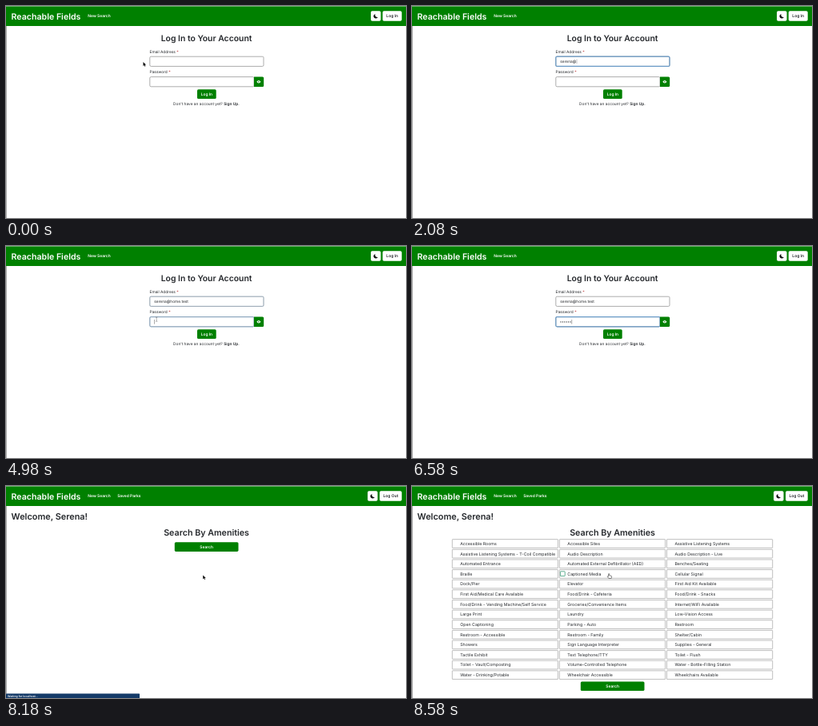
Animation, 500 px wide and 265 px high, one loop 8780 ms. Source, as an HTML page:

```html
<!DOCTYPE html>
<html lang="en">
<head>
<meta charset="utf-8">
<title>Log in demo</title>
<style>
html, body { margin: 0; width: 100%; height: 100%; overflow: hidden; background: #fff; }
svg { display: block; width: 500px; height: 265px; font-family: Inter, sans-serif; text-rendering: geometricPrecision; }
</style>
</head>
<body>
<svg id="stage" viewBox="0 0 500 265"></svg>
<script>
const LOOP = 8780, GREEN = '#008000', INK = '#25282c';
const EMAIL = 'serena@home.test';
const EMAIL_KEYS = [[1480, 1], [1580, 2], [1680, 3], [1780, 4], [1880, 6], [2080, 7], [2480, 8],
  [2580, 9], [2680, 10], [2780, 11], [2980, 12], [3080, 13], [3280, 16]];
const PASS_KEYS = [[5780, 1], [5880, 2], [5980, 3], [6080, 5], [6180, 6]];
const AMENITIES = `Accessible Rooms|Accessible Sites|Assistive Listening Systems
Assistive Listening Systems - T-Coil Compatible|Audio Description|Audio Description - Live
Automated Entrance|Automated External Defibrillator (AED)|Benches/Seating
Braille|Captioned Media|Cellular Signal
Dock/Pier|Elevator|First Aid Kit Available
First Aid/Medical Care Available|Food/Drink - Cafeteria|Food/Drink - Snacks
Food/Drink - Vending Machine/Self Service|Groceries/Convenience Items|Internet/WiFi Available
Large Print|Laundry|Low-Vision Access
Open Captioning|Parking - Auto|Restroom
Restroom - Accessible|Restroom - Family|Shelter/Cabin
Showers|Sign Language Interpreter|Supplies - General
Tactile Exhibit|Text Telephone/TTY|Toilet - Flush
Toilet - Vault/Composting|Volume-Controlled Telephone|Water - Bottle-Filling Station
Water - Drinking/Potable|Wheelchair Accessible|Wheelchairs Available`.split('\n').map(row => row.split('|'));

const clamp = v => Math.max(0, Math.min(1, v));
const ramp = (t, a, b) => { const k = clamp((t - a) / (b - a)); return k * k * (3 - 2 * k); };
const mix = (a, b, k) => a + (b - a) * k;
const typed = (t, keys) => keys.reduce((n, [at, count]) => t >= at ? count : n, 0);

const text = (x, y, s, size = 4.8, weight = 400, fill = INK, anchor = 'start') =>
  `<text x="${x}" y="${y}" font-size="${size}" font-weight="${weight}" fill="${fill}" text-anchor="${anchor}">${s}</text>`;
const rect = (x, y, w, h, fill, r = 0, extra = '') =>
  `<rect x="${x}" y="${y}" width="${w}" height="${h}" rx="${r}" fill="${fill}" ${extra}/>`;
const path = (d, extra) => `<path d="${d}" ${extra}/>`;
const title = (y, s, size) => text(250.6, y, s, size, 600, INK, 'middle');
const button = (x, y, w, h, s, fill = GREEN) =>
  rect(x, y, w, h, fill, 1.6) + text(x + w / 2, y + h / 2 + 1.75, s, 4.9, 600, '#fff', 'middle');

function nav(inside) {
  const x = inside ? 467 : 470.7, moon = inside ? 452 : 456;
  return rect(0, 0, 500, 25, GREEN) + rect(0, 0, 500, .5, '#cfe3cf') + rect(0, 25, .6, 240, '#777')
    + text(6.6, 16.6, 'Reachable Fields', 10.6, 600, '#fff')
    + text(102.2, 14.4, 'New Search', 4.9, 600, '#fff')
    + (inside ? text(139.2, 14.4, 'Saved Parks', 4.9, 600, '#fff') : '')
    + rect(moon, 6.3, 12.5, 12.5, '#fff', 1.8)
    + path(`M${moon + 5.6} 9.9a2.9 2.9 0 1 0 3.3 4.1a2.9 2.9 0 0 1 -3.3 -4.1z`, 'fill="#111"')
    + rect(x, 6.3, 494.7 - x, 12.5, '#fff', 1.8)
    + text((x + 494.7) / 2, 14.4, inside ? 'Log Out' : 'Log In', 5, 600, INK, 'middle');
}

function field(y, w, focus) {
  return rect(179.8, y, w, 12.2, '#fff', 1.5, 'stroke="#8a8a8a" stroke-width=".7"')
    + rect(179.8, y, w, 12.2, 'none', 1.5, `stroke="#6a9bc8" stroke-width="1.2" opacity="${focus}"`);
}

const caret = (x, y) => rect(x, y, .5, 5.6, '#555');

function loginPage(t) {
  const chars = typed(t, EMAIL_KEYS), dots = typed(t, PASS_KEYS);
  const caretInEmail = t >= 1480 && t < 3780, caretInPass = t >= 4880 && t < 7480;
  let s = nav(false) + title(43.8, 'Log In to Your Account', 10.4);
  const label = (y, name) => text(179.6, y, `${name} <tspan fill="#b33">*</tspan>`);
  s += label(58.8, 'Email Address') + label(84, 'Password');
  s += field(63.2, 142.2, ramp(t, 480, 780) * (1 - ramp(t, 4780, 5080)));
  s += text(185.3, 70.8, EMAIL.slice(0, chars) + (caretInEmail ? '<tspan font-weight="300">|</tspan>' : ''));
  s += field(88.6, 130.2, ramp(t, 4780, 5180) * (1 - ramp(t, 7380, 7680)));
  for (let i = 0; i < dots; i++) s += `<circle cx="${186 + i * 2.4}" cy="94.9" r=".65" fill="${INK}"/>`;
  if (caretInPass) s += caret(185.2 + dots * 2.4, 92);
  s += path('M310 88.4h10.6q1.6 0 1.6 1.6v9.4q0 1.6 -1.6 1.6h-10.6z', `fill="${GREEN}"`)
    + path('M313.3 94.7q2.6 -3.6 5.2 0q-2.6 3.6 -5.2 0z', 'fill="#fff"')
    + `<circle cx="315.9" cy="94.7" r=".75" fill="${GREEN}"/>`;
  s += button(239, 104.2, 23.7, 11.8, 'Log In', t >= 7280 ? '#006b00' : GREEN);
  return s + text(250.4, 124.2, 'Don\'t have an account yet? <tspan font-weight="600">Sign Up.</tspan>', 4.8, 400, INK, 'middle');
}

function searchPage(t) {
  const listed = t >= 8380;
  let s = nav(true) + text(6.6, 42, 'Welcome, Serena!', 10.9, 600) + title(61.8, 'Search By Amenities', 10.7);
  if (listed) AMENITIES.forEach((row, r) => row.forEach((name, c) => {
    const x = 50.3 + c * 134.1, y = 66.7 + r * 12.63;
    s += rect(x, y, 132.2, 10.7, '#fff', .5, 'stroke="#949494" stroke-width=".6"') + text(x + 9.9, y + 7.2, name, 5.25);
  }));
  else s += rect(0, 259.6, 167, 5.4, '#143a68', .6) + text(2, 263.6, 'Waiting for localhost...', 3.5, 600, '#fff');
  if (t >= 8580) s += rect(185.4, 106.8, 5.8, 5.8, '#fff', .5, 'stroke="#3a9b78" stroke-width=".8"');
  return s + button(210.8, listed ? 244.4 : 70.2, 79.7, 11.7, 'Search');
}

const SHAPES = {
  arrow: path('M0 0V5L1.2 3.9 2 5.7 2.9 5.3 2.1 3.6H3.6Z', 'fill="#111" stroke="#fff" stroke-width=".5" paint-order="stroke"'),
  beam: path('M-1.2 -2.8Q0 -2.8 0 -2V2Q0 2.8 -1.2 2.8M1.2 -2.8Q0 -2.8 0 -2M0 2Q0 2.8 1.2 2.8', 'fill="none" stroke="#666" stroke-width=".5"'),
  hand: path('M-.6 -1.6q.6 -.7 1.1 0v2l2.3 .5q.7 .3 .6 1l-.5 2.2h-3.2l-1.7 -2.3q.1 -.9 1.4 -.1z', 'fill="#fff" stroke="#222" stroke-width=".55"')
};

function pointer(t) {
  let x, y, shape = 'beam';
  if (t < 1480) {
    const k = ramp(t, 0, 380);
    x = mix(171.5, 186.1, k); y = mix(70, 69.2, k);
    if (x < 180) shape = 'arrow';
  } else if (t >= 4180 && t < 5780) {
    const k = ramp(t, 4180, 4780);
    x = mix(186.1, 188.2, k); y = mix(69.2, 91.6, k);
    if (y > 76 && y < 88) shape = 'arrow';
  } else if (t >= 6680) {
    const k = ramp(t, 6580, 7280);
    x = mix(188.2, 246.2, k); y = mix(91.6, 111.4, k);
    if (y > 101) shape = x > 239 && y > 104.4 ? 'hand' : 'arrow';
    if (t >= 8180) shape = t < 8480 ? 'arrow' : 'hand';
  } else return '';
  return `<g transform="translate(${x} ${y})">${SHAPES[shape]}</g>`;
}

const stage = document.getElementById('stage'), start = performance.now();
let shown = -1;
function draw(now) {
  const time = Math.max(0, now - start) % LOOP;
  const t = time < 100 ? 0 : time < 180 ? 100 : Math.floor((time - 80) / 100) * 100 + 80;
  if (t !== shown) {
    stage.innerHTML = (t < 8180 ? loginPage(t) : searchPage(t)) + pointer(t);
    shown = t;
  }
  requestAnimationFrame(draw);
}
draw(start);
</script>
</body>
</html>
```
